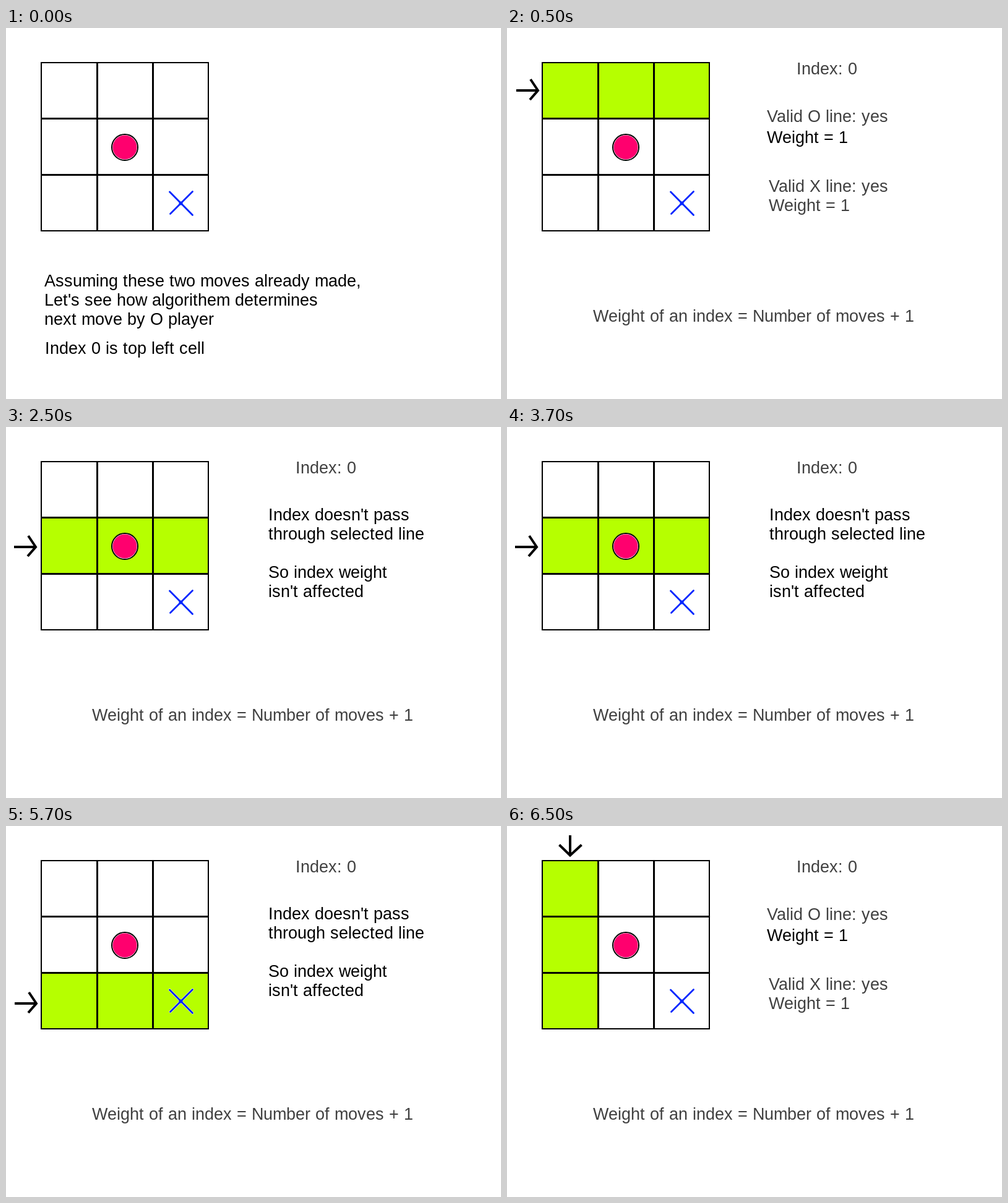
An HTML page that plays this animation: 800 by 600 pixels, repeating every 8 s.

```html
<!DOCTYPE html>
<html lang="en">
<head>
<meta charset="utf-8">
<title>Tic-tac-toe line weights</title>
<style>
html, body { margin: 0; width: 100%; height: 100%; overflow: hidden; background: #fff; }
svg { display: block; width: 800px; height: 600px; }
text { font: 27px "Liberation Sans", Arial, sans-serif; white-space: pre; }
.hidden { display: none; }
.line { fill: none; stroke: #000; }
</style>
</head>
<body>
<svg viewBox="0 0 800 600">
  <g id="marks"></g>
  <path class="line" stroke-width="2" d="M57 56H327V328H57Z"/>
  <path class="line" stroke-width="3" d="M147.5 56V328M237.5 56V328M57 146.5H327M57 237.5H327"/>
  <circle cx="192" cy="193" r="21" fill="#fff" stroke="#000" stroke-width="2"/>
  <circle cx="192" cy="193" r="19.5" fill="#ff006e"/>
  <g fill="none" stroke-linecap="round">
    <path id="cross" d="M264.5 265L301.5 302.5M301.5 264.5L265.5 300.5" stroke="#fff" stroke-width="4.5" opacity=".6"/>
    <use href="#cross" style="display:none"/>
    <path d="M264.5 265L301.5 302.5M301.5 264.5L265.5 300.5" stroke="#0026ff" stroke-width="2.8"/>
  </g>
  <circle cx="282.5" cy="283.5" r="3" fill="#0026ff"/>
  <g id="words"></g>
</svg>
<script>
const NS = "http://www.w3.org/2000/svg";
const GRAY = "#404040", BLACK = "#000", LOOP = 8000;
const STARTS = [0, 500, 2500, 4500, 6500];
const marks = document.getElementById("marks");
const words = document.getElementById("words");
const ruler = document.createElement("canvas").getContext("2d");
ruler.font = '27px "Liberation Sans", Arial, sans-serif';
const width = s => ruler.measureText(s).width;
const items = [];

function add(parent, tag, attrs, scenes) {
  const el = document.createElementNS(NS, tag);
  for (const key in attrs) el.setAttribute(key, attrs[key]);
  parent.append(el);
  items.push({ el, scenes });
  return el;
}

// Glyphs advance by whole pixels, kerning included.
function glyphXs(s, x) {
  return [...s].map((c, i) => {
    const at = x, next = s[i + 1] || "";
    x += Math.round(width(c)) + Math.round(width(c + next) - width(c) - width(next));
    return at;
  }).join(" ");
}

function write(scenes, x, y, fill, ...lines) {
  lines.forEach((s, i) => {
    add(words, "text", { x: glyphXs(s, x), y: y + 31 * i, fill }, scenes).textContent = s;
  });
}

function band(scene, x, y, w, h) {
  add(marks, "rect", { x, y, width: w, height: h, fill: "#b6ff00" }, [scene]);
}

function arrow(scene, d) {
  add(marks, "path", { d, class: "line", "stroke-width": 4 }, [scene]);
}

const rightArrow = (x, y) => `M${x - 36} ${y}H${x - 1}M${x - 13} ${y - 18}L${x - 1} ${y}L${x - 14} ${y + 15}`;

band(1, 57, 56, 270, 90);
band(2, 57, 147, 270, 90);
band(3, 57, 238, 270, 90);
band(4, 57, 56, 90, 272);
arrow(1, rightArrow(51, 101));
arrow(2, rightArrow(49, 194));
arrow(3, rightArrow(50, 287));
arrow(4, "M102 15V48M84.5 30.5L102 47.5L120.5 30.5");

write([0], 62, 418, BLACK, "Assuming these two moves already made,",
  "Let's see how algorithem determines", "next move by O player");
write([0], 63, 527, BLACK, "Index 0 is top left cell");
write([1, 2, 3, 4], 468, 75, GRAY, "Index: 0");
write([1, 2, 3, 4], 139, 475, GRAY, "Weight of an index = Number of moves + 1");
write([1, 4], 420, 152, GRAY, "Valid O line: yes");
write([1, 4], 420, 186, BLACK, "Weight = 1");
write([1, 4], 423, 265, GRAY, "Valid X line: yes", "Weight = 1");
write([2, 3], 424, 151, BLACK, "Index doesn't pass", "through selected line");
write([2, 3], 424, 244, BLACK, "So index weight", "isn't affected");

let shown = -1, begin;
function draw(now) {
  begin ??= now;
  const t = (now - begin) % LOOP;
  const scene = STARTS.findLastIndex(s => t >= s);
  if (scene !== shown) {
    shown = scene;
    for (const { el, scenes } of items) el.classList.toggle("hidden", !scenes.includes(scene));
  }
  requestAnimationFrame(draw);
}
draw(performance.now());
</script>
</body>
</html>
```
